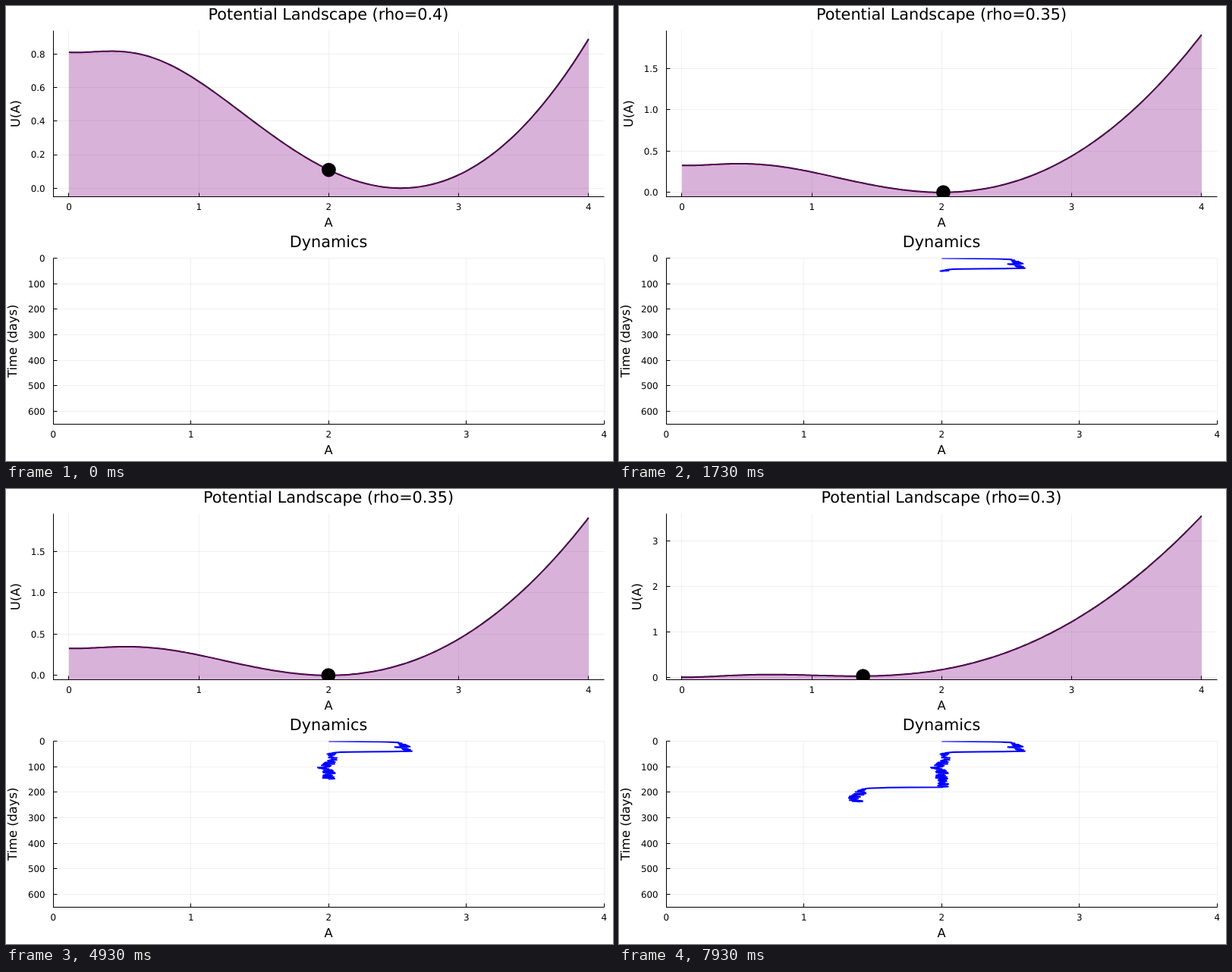
Write an HTML page that moves like this. It is 800 by 600 pixels and loops after 8 s.

```html
<!DOCTYPE html>
<html lang="en">
<head>
<meta charset="utf-8">
<title>Potential Landscape</title>
<style>
html, body { margin: 0; width: 100%; height: 100%; overflow: hidden; background: #fff; }
svg { display: block; width: 800px; height: 600px; font-family: "DejaVu Sans", sans-serif; text-rendering: geometricPrecision; }
.title { font-size: 20.8px; }
.guide { font-size: 16.3px; }
.tick { font-size: 11.9px; }
.grid { stroke: #000; stroke-opacity: .06; }
.axis { stroke: #000; }
path { fill: none; }
</style>
</head>
<body>
<svg id="stage" viewBox="0 0 800 600"></svg>
<script>
const LOOP = 8000, STEPS = 120, DAYS_PER_STEP = 2;
const LEFT = 62.4, RIGHT = 788.4, MID = 425, HEIGHT = 218.7;
const TOP = 32.5, FLOOR = TOP + HEIGHT, TOP2 = 332.6;
const GAIN = 3, INFLOW = 0.05, RATE = 0.72, NOISE = 0.09;

// keys: [day, A] points the noisy path passes through
const phases = [
  { rho: 0.4, from: 0, loss: 1.0377, tick: 0.2, digits: 1,
    keys: [[10, 2.51], [20, 2.57], [24, 2.495], [38, 2.598], [40, 2.53]] },
  { rho: 0.35, from: 40, loss: 1.2257, tick: 0.5, digits: 1,
    keys: [[54, 2.03], [84, 2.01], [102, 1.962], [120, 2.005], [148, 1.997], [180, 2.006]] },
  { rho: 0.3, from: 180, loss: 1.4722, tick: 1, digits: 0,
    keys: [[190, 1.43], [208, 1.405], [224, 1.345], [238, 1.394]] }
];

const drift = (p, a) => INFLOW + GAIN * a * a / (1 + a * a) - p.loss * a;
const rawU = (p, a) => p.loss * a * a / 2 - INFLOW * a - GAIN * (a - Math.atan(a));
const samples = Array.from({ length: 201 }, (_, i) => i / 50);
for (const p of phases) {
  p.base = Math.min(...samples.map(a => rawU(p, a)));
  p.max = rawU(p, 4) - p.base;
}
const U = (p, a) => rawU(p, a) - p.base;

let seed = 7;
const random = () => (seed = (seed * 16807) % 2147483647) / 2147483647;

// Daily path: gradient flow, bent to meet the keys, plus noise that fades in
const path = [2];
for (const p of phases) {
  let flow = path[p.from], day = p.from, bend = 0;
  for (const [keyDay, keyA] of p.keys) {
    const span = [];
    while (day + span.length < keyDay) {
      for (let i = 0; i < 20; i++) flow += drift(p, flow) * RATE / 20;
      span.push(flow);
    }
    const nextBend = keyA - flow;
    span.forEach((a, i) => {
      const part = (i + 1) / span.length;
      const fade = part < 1 ? Math.min(1, (day + i + 1 - p.from) / 12) : 0;
      path[day + i + 1] = a + bend + (nextBend - bend) * part + (random() - 0.5) * NOISE * fade;
    });
    day = keyDay;
    bend = nextBend;
  }
}

const xTop = a => LEFT + (RIGHT - LEFT) * (a + 0.12) / 4.24;
const yTop = (p, u) => FLOOR - (u + 0.05) / (p.max + 0.1) * HEIGHT;
const xLow = a => LEFT + (RIGHT - LEFT) * a / 4;
const yLow = day => TOP2 + HEIGHT * day / 650;
const snap = v => Math.floor(v) + 0.5;
const line = (cls, x1, y1, x2, y2) => `<path class="${cls}" d="M${x1} ${y1}L${x2} ${y2}"/>`;
const text = (cls, x, y, s, anchor = "middle") =>
  `<text class="${cls}" x="${x}" y="${y}" text-anchor="${anchor}">${s}</text>`;
const sideText = (x, y, s) =>
  `<text class="guide" transform="translate(${x} ${y}) rotate(-90)" text-anchor="middle">${s}</text>`;
const polyline = pts => "M" + pts.map(([x, y]) => x.toFixed(2) + " " + y.toFixed(2)).join("L");

function axes(top, xScale, yTicks) {
  const floor = snap(top + HEIGHT), left = snap(LEFT), right = snap(RIGHT);
  let grid = "", marks = "";
  for (let a = 0; a <= 4; a++) {
    const x = snap(xScale(a));
    grid += line("grid", x, top, x, floor);
    marks += line("axis", x, floor, x, floor - 5) + text("tick", xScale(a), top + HEIGHT + 17.6, a);
  }
  for (const [pos, label] of yTicks) {
    const y = snap(pos);
    grid += line("grid", left, y, right, y);
    marks += line("axis", left, y, left + 5, y) + text("tick", 51.6, pos + 4.4, label, "end");
  }
  return grid + marks + line("axis", left, top, left, floor + 0.5) +
    line("axis", left, floor, right, floor) + text("guide", MID, top + HEIGHT + 39.6, "A");
}

function landscape(p) {
  const ticks = [];
  for (let i = 0; i * p.tick < p.max; i++) {
    ticks.push([yTop(p, i * p.tick), (i * p.tick).toFixed(p.digits)]);
  }
  const curve = polyline(samples.map(a => [xTop(a), yTop(p, U(p, a))]));
  return axes(TOP, xTop, ticks) +
    text("title", MID, 18, `Potential Landscape (rho=${p.rho})`) +
    sideText(p.digits ? 17.6 : 29, 142, "U(A)") +
    `<path d="${curve}" stroke="#000" stroke-width="2"/>` +
    `<path d="${curve}L${xTop(4)} ${FLOOR}L${xTop(0)} ${FLOOR}Z" style="fill:purple;fill-opacity:.3"/>` +
    `<path d="${curve}" stroke="purple"/>`;
}

const clip = (id, top) =>
  `<clipPath id="${id}"><rect x="${LEFT}" y="${top}" width="${RIGHT - LEFT}" height="${HEIGHT + 0.5}"/></clipPath>`;
const dayTicks = Array.from({ length: 7 }, (_, i) => [yLow(i * 100), i * 100]);
const stage = document.getElementById("stage");
stage.innerHTML = clip("clipTop", TOP) + clip("clipLow", TOP2) +
  phases.map(p => `<g class="view">${landscape(p)}</g>`).join("") +
  `<circle id="ball" r="9.4" clip-path="url(#clipTop)"/>` +
  axes(TOP2, xLow, dayTicks) + text("title", MID, 318, "Dynamics") +
  sideText(13.8, 441.8, "Time (days)") +
  `<g clip-path="url(#clipLow)"><path id="trace" stroke="#00f" stroke-width="2" stroke-linejoin="round"/></g>`;

const views = stage.querySelectorAll(".view");
const ball = document.getElementById("ball"), trace = document.getElementById("trace");
let shown = -1;

function draw(now) {
  const step = Math.min(STEPS - 1, Math.floor((now % LOOP + 4) * STEPS / LOOP));
  if (step === shown) return;
  shown = step;
  const day = step * DAYS_PER_STEP, a = path[day];
  const index = phases.filter(p => p.from <= day).length - 1;
  views.forEach((v, i) => v.setAttribute("display", i === index ? "inline" : "none"));
  ball.setAttribute("cx", xTop(a));
  ball.setAttribute("cy", yTop(phases[index], U(phases[index], a)));
  trace.setAttribute("d", day ? polyline(path.slice(0, day + 1).map((v, d) => [xLow(v), yLow(d)])) : "");
}

const start = performance.now();
function tick() {
  draw(performance.now() - start);
  requestAnimationFrame(tick);
}
tick();
</script>
</body>
</html>
```
